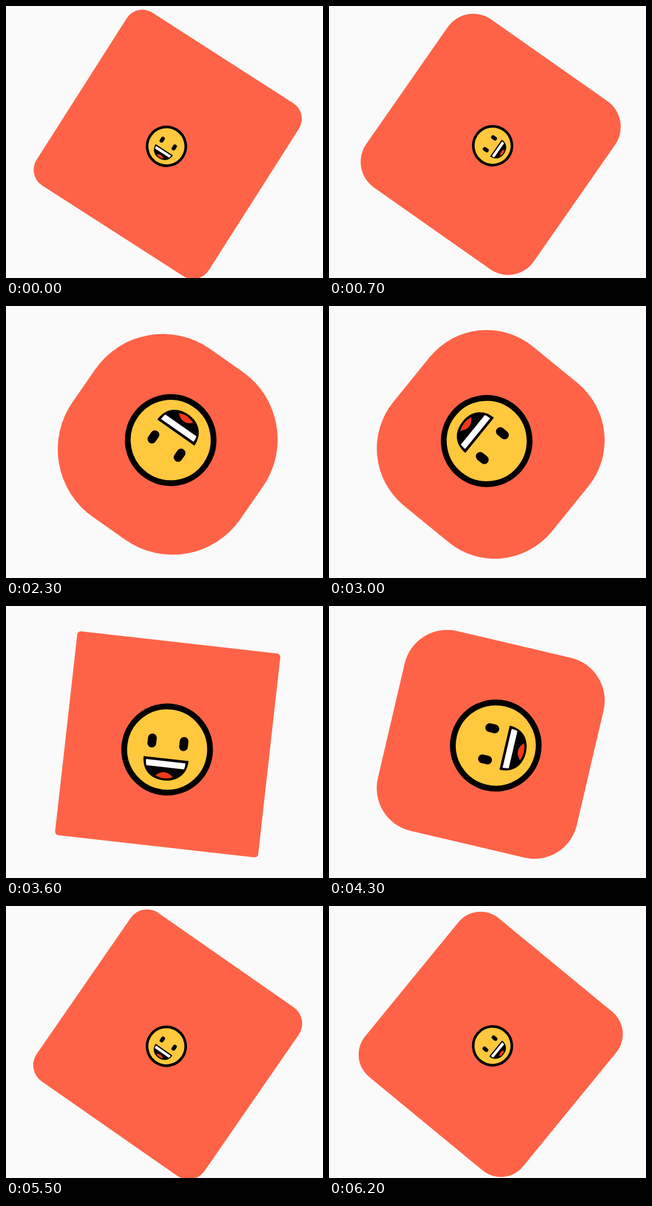
An HTML page that plays this animation: 543 by 464 pixels, repeating every 6300 ms.

```html
<!DOCTYPE html>
<html lang="en">
<head>
<meta charset="utf-8">
<title>Rolling smile</title>
<style>
  html, body { margin: 0; height: 100%; overflow: hidden; background: #fafafa; }
  svg { display: block; width: 543px; height: 464px; }
</style>
</head>
<body>
<svg viewBox="0 0 543 464">
  <g id="spinner">
    <rect id="card" x="-175" y="-175" width="350" height="350" fill="#ff6347"/>
    <g id="face">
      <circle r="73.5" fill="#ffc83d" stroke="#000" stroke-width="10"/>
      <path d="M-27.3 -17v9M27.3 -17v9" stroke="#000" stroke-width="15" stroke-linecap="round"/>
      <path d="M-38.7 15.5H38.7C38.7 39 23 53 0 53S-38.7 39 -38.7 15.5Z"/>
      <path d="M-34 20H34Q34 26 32.5 30.5H-32.5Q-34 26 -34 20Z" fill="#fff"/>
      <path d="M-15 46Q0 32 15 46Q0 53 -15 46Z" fill="#f03a17"/>
    </g>
  </g>
</svg>
<script>
  const LOOP = 6300, STEP = 100;
  const GROW = 1100, SHRINK = 5500;
  // Nearly constant spin: [time in ms, total degrees]
  const SPIN = [[0, 32.6], [700, 305], [1600, 660.6], [3000, 1209.2],
                [4300, 1723.2], [4800, 1920.1], [6200, 2469.4]];
  const [spinner, card, face] = ['spinner', 'card', 'face'].map(id => document.getElementById(id));

  function angleAt(t) {
    const i = SPIN.findIndex(([end], n) => n > 0 && t <= end);
    const [t0, a0] = SPIN[i - 1], [t1, a1] = SPIN[i];
    return (a0 + (a1 - a0) * (t - t0) / (t1 - t0)) % 360;
  }

  function draw(now) {
    const t = Math.floor(now % LOOP / STEP) * STEP;
    const angle = angleAt(t);
    const scale = t >= GROW && t < SHRINK ? 1 : 0.45;
    // Square at 0 degrees, full circle at 180
    card.setAttribute('rx', 175 * (1 - Math.abs(180 - angle) / 180));
    spinner.setAttribute('transform', `translate(277 236) rotate(${angle})`);
    face.setAttribute('transform', `scale(${scale}) translate(0 8.9)`);
  }

  const start = performance.now();
  function tick() {
    draw(performance.now() - start);
    requestAnimationFrame(tick);
  }
  tick();
</script>
</body>
</html>
```
